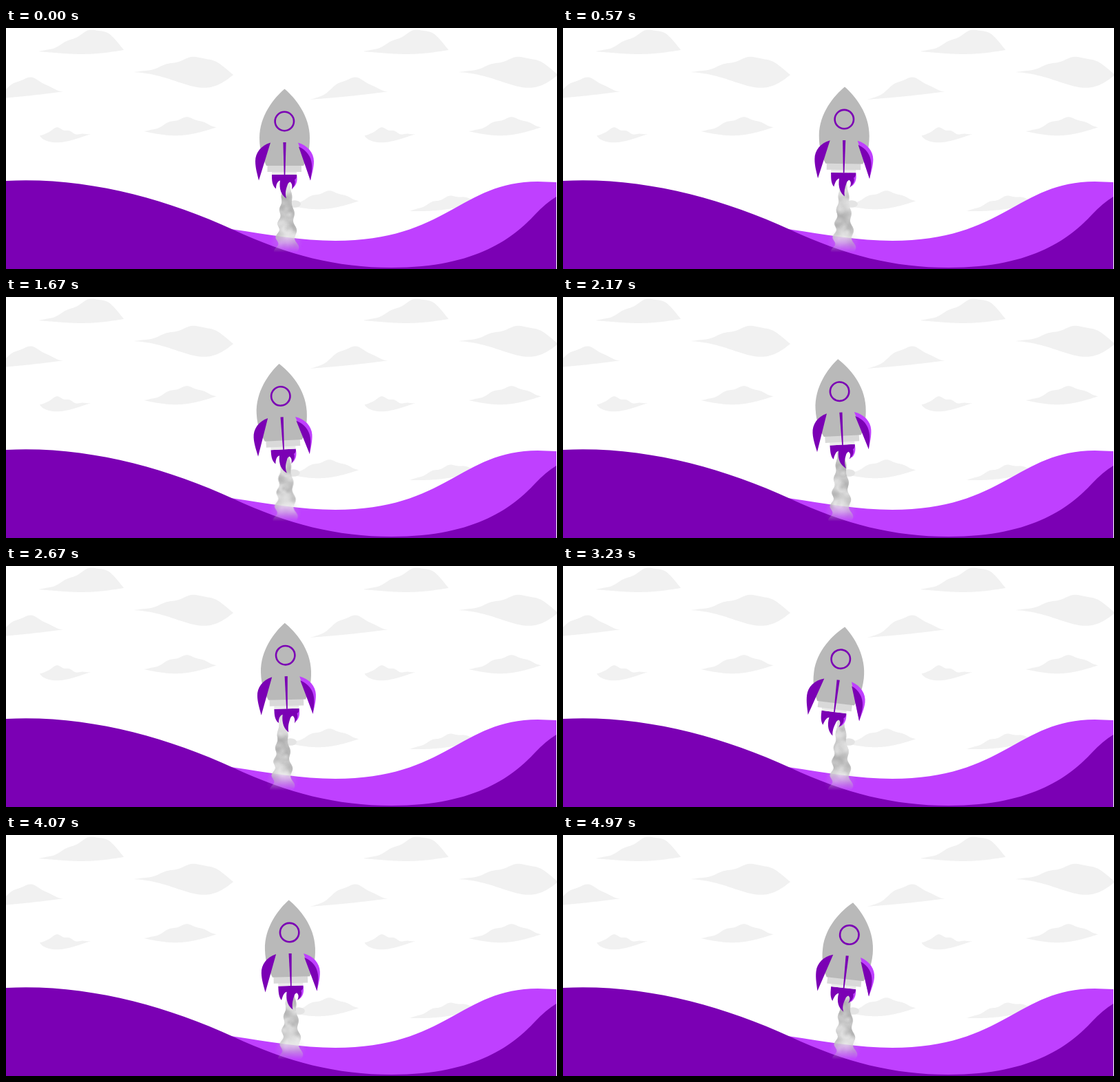
Recreate the animation shown at these times as an HTML page with a canvas. Size 800 px wide and 350 px high, loop 5010 ms.

```html
<!DOCTYPE html>
<html lang="en">
<head>
<meta charset="utf-8">
<title>Rocket launch</title>
<style>
html, body { margin: 0; width: 100%; height: 100%; overflow: hidden; background: #fff; }
canvas { display: block; }
</style>
</head>
<body>
<canvas id="stage" width="800" height="350"></canvas>
<script>
const LOOP = 5010, FRAMES = 150, W = 800, H = 350;
const DARK = '#7b00b4', LIGHT = '#bf40ff', GREY = '#b9b9b9', CLOUD = '#f1f1f1';
const { sin, cos, pow, PI } = Math;
const ctx = document.getElementById('stage').getContext('2d');

function fill(path, color) {
  ctx.fillStyle = color;
  ctx.fill(path);
}

// Closed shape between two edges, sampled along u = 0..1.
function band(upper, lower, steps = 60) {
  const p = new Path2D();
  for (let i = 0; i <= steps; i++) p.lineTo(...upper(i / steps));
  for (let i = steps; i >= 0; i--) p.lineTo(...lower(i / steps));
  p.closePath();
  return p;
}

// A hump that peaks at u = peak.
const hump = (u, peak, sharp = 1) =>
  pow(Math.max(0, sin(PI * pow(u, Math.log(.5) / Math.log(peak)))), sharp);

// tilt: rise of the right tip; top and belly: [height, peak, sharpness].
function cloud(x, y, w, tilt, top, belly) {
  const [up, upAt, upSharp] = top, [down, downAt] = belly;
  const base = u => y - tilt * u;
  const ripple = u => 1.4 * sin(PI * u) * sin(24 * u);
  return band(
    u => [x + w * u, base(u) - up * hump(u, upAt, upSharp) - ripple(u)],
    u => [x + w * u, base(u) + down * hump(u, downAt)]);
}

const tall = cloud(45, 34, 126, 2, [30, .68, 1], [5, .55]);
const wide = cloud(183, 64, 147, -4, [24, .66, 1], [20, .7]);
const peak = cloud(440, 104, 117, 12, [25, .53, 2], [1, .5]);
const flat = cloud(200, 150, 106, 6, [16, .57, 1.5], [9, .5]);
const small = cloud(49, 156, 74, 2, [10, .35, 4], [11, .35]);
const low = cloud(585, 266, 100, 12, [14, .62, 1], [4, .5]);

function sky() {
  for (const shift of [0, 471.5]) {
    for (const c of [tall, wide, flat, small]) place(c, shift, 0);
    place(peak, shift - 471.5, 0);
  }
  place(flat, 207, 107);
  place(low, 0, 0);
}

function place(path, x, y) {
  ctx.save();
  ctx.translate(x, y);
  fill(path, CLOUD);
  ctx.restore();
}

const backHill = new Path2D(
  'M300 350V287L330 292.5C380 300 430 309 478 309C640 309 660 223 772 223L799 224V350Z');
const frontHill = new Path2D(
  'M0 350V222C115 216 230 247 330 293C410 330 480 348 560 348C685 348 738 303 768 271Q784 254 799 245V350Z');

// Rocket parts, measured from the centre of the window.
const body = new Path2D('M.5-47C-15-34-36-8-36 24C-36 43-31 55-26 64.5H28C33 55 37 43 37 24C37-8 16-34 .5-47Z');
const leftFin = new Path2D('M-20 31C-34 35-42 46-42 58C-42 68-39 77-37 86Z');
const rightGlow = new Path2D('M20 31C34 35 43 46 43 58C43 68 40 77 38 86Z');
const rightFin = new Path2D('M21 37C33 42 39 52 40 62C41 70 39 79 38 86Z');
const spine = new Path2D('M-1.6 30.5H2.6L1.3 78H-.3Z');

// Key poses of the drift: time, window x and y, tilt in degrees, smoke shift.
const POSES = [
  [0, 404, 135.5, 0, 0],
  [1070, 410.5, 131.5, .7, -.5],
  [1670, 398.5, 144, -3, -1.5],
  [2670, 405.5, 129.5, -1.3, -6],
  [3230, 403, 135.5, 7.2, -4],
  [3730, 408, 145, 3, 1],
  [4070, 411.5, 141.5, -1.5, 6],
  [4970, 415.5, 145, 6.2, 2]
];

// Smooth cubic through the poses.
function pose(t) {
  const last = POSES.length - 1;
  let i = 0;
  while (i < last - 1 && POSES[i + 1][0] <= t) i++;
  const a = POSES[i], b = POSES[i + 1], h = b[0] - a[0];
  const u = Math.min(1, (t - a[0]) / h), w = 1 - u;
  const slope = (j, k) => {
    if (j === 0 || j === last) return 0;
    const p = POSES[j - 1], n = POSES[j + 1];
    return (n[k] - p[k]) / (n[0] - p[0]);
  };
  const at = k => a[k] * (1 + 2 * u) * w * w + b[k] * u * u * (3 - 2 * u)
    + h * u * w * (slope(i, k) * w - slope(i + 1, k) * u);
  return { x: at(1), y: at(2), angle: at(3) * PI / 180, smoke: at(4) };
}

function flame(t) {
  const s = sin(t / 110), r = cos(t / 140);
  fill(new Path2D('M8 77.5H18C20 87 17 94 12 97C14 91 12 86 8 84Z'), LIGHT);
  fill(new Path2D(`M-18 77.5H18Q19 82 15 85C17 90 14 95 ${10 + r} 99C12 93 11 90 8.5 88
    Q5.5 89 4.5 93C2 100 1 105 ${3 + s} 112C-4 107 -8 99 -6 86C-10 87 -12 92 ${-13 + r} 98
    C-18 93 -18 85 -18 77.5Z`), DARK);
}

function rocket(t, { x, y, angle }) {
  ctx.save();
  ctx.translate(x, y);
  ctx.rotate(angle);
  flame(t);
  ctx.fillStyle = '#ebebeb';
  ctx.fillRect(-18, 73, 36, 4.5);
  ctx.fillStyle = '#d9d9d9';
  ctx.fillRect(-24.5, 64, 49.5, 9.5);
  fill(body, GREY);
  fill(rightGlow, LIGHT);
  fill(rightFin, DARK);
  fill(leftFin, DARK);
  fill(spine, DARK);
  ctx.beginPath();
  ctx.arc(.3, 0, 13.7, 0, 7);
  ctx.lineWidth = 2.6;
  ctx.strokeStyle = DARK;
  ctx.stroke();
  ctx.restore();
}

let seed = 7;
const rand = () => (seed = seed * 16807 % 2147483647) / 2147483647;
const puffs = Array.from({ length: 46 }, (_, i) => ({
  x: rand() * 2 - 1, y: rand(), r: 5 + rand() * 6, tone: i % 2 ? '238,238,238' : '165,165,165'
}));

// Lumpy column that widens towards the ground.
const TOP = 214, TALL = 114;
const spread = v => 2.5 + 13.5 * pow(v, .8);
const side = (dir, rate, phase) => v => {
  const y = TOP + TALL * v;
  return [407.5 + dir * (spread(v) + 3 * v * sin(y * rate - phase)), y];
};
const column = band(side(-1, .31, 4.56), side(1, .25, 2.6));

const layer = document.createElement('canvas');
layer.width = W;
layer.height = H;
const ink = layer.getContext('2d');
const fade = ink.createLinearGradient(0, 298, 0, 326);
fade.addColorStop(0, '#000');
fade.addColorStop(.5, 'rgba(0,0,0,.6)');
fade.addColorStop(1, 'rgba(0,0,0,0)');

function glow(x, y, r, tone, alpha) {
  const g = ink.createRadialGradient(x, y, 0, x, y, r);
  g.addColorStop(0, `rgba(${tone},${alpha})`);
  g.addColorStop(1, `rgba(${tone},0)`);
  ink.fillStyle = g;
  ink.fillRect(x - r, y - r, 2 * r, 2 * r);
}

function smoke(t, shift) {
  ink.clearRect(0, 0, W, H);
  glow(407, 314, 24, '200,200,200', .6);
  ink.fillStyle = '#e4e4e4';
  ink.beginPath();
  ink.ellipse(419, 255.5, 9, 5.3, 0, 0, 7);
  ink.fill();
  ink.save();
  ink.clip(column);
  ink.fillStyle = '#c8c8c8';
  ink.fillRect(380, TOP, 60, TALL);
  for (const p of puffs) {
    const v = (p.y + 2 * t / LOOP) % 1;
    glow(407.5 + p.x * spread(v), TOP + v * TALL, p.r, p.tone, .55 * Math.min(1, 6 * v, 6 - 6 * v));
  }
  glow(407, 226, 14, '240,240,240', .7);
  glow(408, 304, 18, '240,240,240', .7);
  ink.restore();
  ink.globalCompositeOperation = 'destination-in';
  ink.fillStyle = fade;
  ink.fillRect(0, 0, W, H);
  ink.globalCompositeOperation = 'source-over';
  ctx.drawImage(layer, shift, 0);
}

function draw(now) {
  const t = Math.floor((now % LOOP) / LOOP * FRAMES) * LOOP / FRAMES;
  const p = pose(t);
  ctx.fillStyle = '#fff';
  ctx.fillRect(0, 0, W, H);
  sky();
  fill(backHill, LIGHT);
  fill(frontHill, DARK);
  smoke(t, p.smoke);
  rocket(t, p);
}

const start = performance.now();
function tick() {
  draw(performance.now() - start);
  requestAnimationFrame(tick);
}
tick();
</script>
</body>
</html>
```
